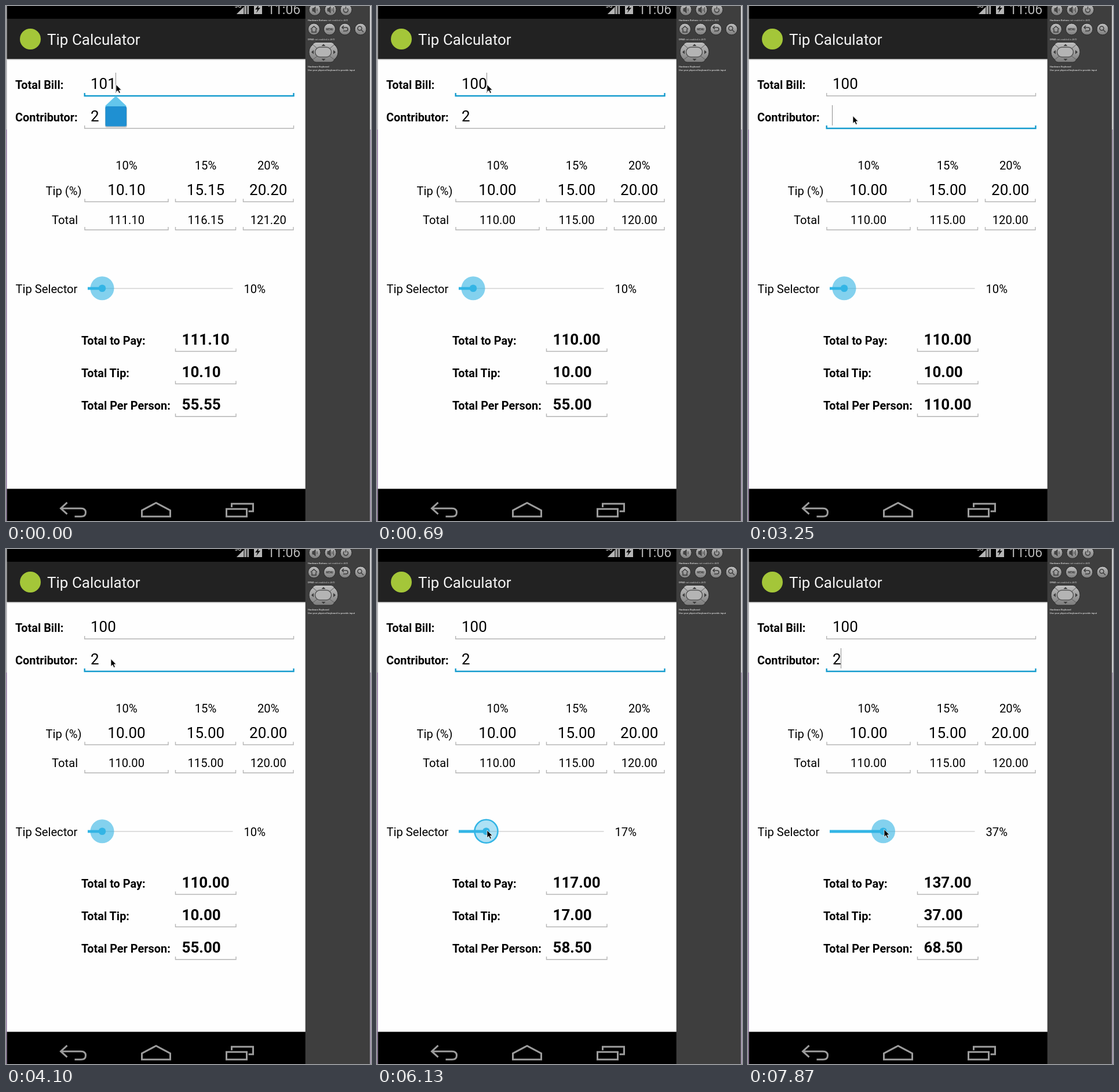
An HTML page that plays this animation: 630x888 px, repeating every 8000 ms.

```html
<!DOCTYPE html>
<html lang="en">
<head>
<meta charset="utf-8">
<title>Tip Calculator</title>
<style>
html, body { margin: 0; width: 100%; height: 100%; overflow: hidden; background: #fff; }
svg { display: block; width: 630px; height: 888px; font-family: Roboto, sans-serif; }
.s { font-size: 20.2px; }
.s.b { font-size: 19.9px; }
.m { font-size: 26px; }
.b { font-weight: 700; }
.c { text-anchor: middle; }
.tiny { font-size: 4.15px; fill: #c4c4c4; }
.line { fill: none; stroke: #b4b4b4; stroke-width: 1.4; }
.line.focus { stroke: #149bcd; stroke-width: 2.4; }
.nav { fill: none; stroke: #9c9c9c; stroke-width: 3; }
.glyph { fill: none; stroke: #3c3c3c; stroke-width: 1.5; }
</style>
</head>
<body>
<svg id="stage" viewBox="0 0 630 888">
  <defs>
    <linearGradient id="key" x2="0" y2="1">
      <stop stop-color="#c0c0c0"/><stop offset="1" stop-color="#7c7c7c"/>
    </linearGradient>
  </defs>
  <rect width="630" height="888" fill="#fefefe"/>
  <rect width="1.5" height="213" fill="#a9a9ad"/>
  <rect y="213" width="1.5" height="675" fill="#8c739c"/>

  <!-- status, title and navigation bars -->
  <rect x="1.500" width="515.500" height="22" fill="#000"/>
  <rect x="1.500" y="22" width="515.500" height="69" fill="#222"/>
  <rect x="1.500" y="91" width="515.500" height="1" fill="#8a8a8a"/>
  <rect x="1.500" y="92" width="515.500" height="1.500" fill="#e4e4e4"/>
  <rect x="1.500" y="832.500" width="515.500" height="55.500" fill="#000"/>
  <g fill="#b5b5b5">
    <text x="395" y="3" font-size="9" class="b">3G</text>
    <path d="M398 14L419 -7V14Z" fill="#555"/>
    <path d="M398 14L410 2V14Z"/>
    <path d="M412 0h2v14h-2zM417 -5h2v19h-2z"/>
    <rect x="428" y="-8" width="14" height="22"/>
    <path d="M437 -3L430 6h4l-2 6 7-9h-4z" fill="#111"/>
    <text x="451" y="13.5" font-size="23">11:06</text>
  </g>
  <circle cx="42" cy="57" r="18" fill="#a4c639"/>
  <text x="71" y="66.500" class="m" fill="#f4f4f4">Tip Calculator</text>
  <g class="nav" transform="translate(-.5 -.8)">
    <path d="M106 857L95 867L106 877M95 867H130Q138 867 138 874T130 881H119"/>
    <path d="M235 881V870.500L259.500 857.500L284 870.500V881Z"/>
    <path d="M381 868H416V881H381ZM390 865V859H427V872H419"/>
  </g>

  <!-- emulator side panel -->
  <rect x="516.700" width="111.800" height="888" fill="#3e3e3e"/>
  <rect x="628.500" width="1.500" height="213" fill="#d9d9dd"/>
  <rect x="628.500" y="213" width="1.500" height="675" fill="#a394b0"/>
  <g id="keys" fill="url(#key)" stroke="#2a2a2a"></g>
  <g class="glyph">
    <path d="M529 4v5h2l3 3V1l-3 3zM537 4v5" fill="#444" stroke-width="1"/>
    <path d="M555 4v5h2l3 3V1l-3 3zM563 4v5M565.500 2v9" fill="#444" stroke-width="1"/>
    <path d="M584 4a4 4 0 1 0 5 0M586.500 1v5"/>
    <path d="M526 40L531.500 35L537 40M528 40V45H535V40"/>
    <path d="M581 37H587a3 3 0 0 1 0 6H582M583 34L580 37L583 40"/>
    <circle cx="610.500" cy="38.500" r="3.500"/><path d="M613 41L617 45"/>
  </g>
  <text x="558.500" y="41.500" class="b c" font-size="4.500" fill="#333">MENU</text>
  <path d="M535 62.500H561Q565 62.500 567 67Q573 72 573 79.500T567 92Q565 97 561 97H535Q531 97 529 92Q523 87 523 79.500T529 67Q531 62.500 535 62.500Z" fill="url(#key)" stroke="#2a2a2a"/>
  <path d="M530 67L538 74M566 67L558 74M530 92L538 86M566 92L558 86" stroke="#5c5c5c"/>
  <rect x="533.500" y="71" width="28" height="17" rx="8.500" fill="#b4b4b4" stroke="#555" stroke-width="1.500"/>
  <path d="M544.500 69h7l-3.500-3.500zM544.500 91h7l-3.500 3.500zM531 76v7l-4-3.500zM565 76v7l4-3.500z" fill="#3c3c3c"/>
  <g class="tiny">
    <text x="521" y="26"><tspan class="b">Hardware Buttons</tspan> not enabled in AVD</text>
    <text x="521" y="58.500"><tspan class="b">DPAD</tspan> not enabled in AVD</text>
    <text x="521" y="106" class="b">Hardware Keyboard</text>
    <text x="521" y="112" class="b">Use your physical keyboard to provide input</text>
  </g>

  <g id="form"></g>

  <g id="slider">
    <path d="M142 487H391.500" stroke="#dedede" stroke-width="1.800"/>
    <path id="bar" stroke="#33b5e5" stroke-width="4.800"/>
    <g id="thumb">
      <circle id="halo" r="20.500" fill="#33b5e5"/>
      <circle id="ring" r="20" fill="none" stroke="#33b5e5" stroke-width="2.600"/>
      <circle r="6.300" fill="#33b5e5"/>
    </g>
  </g>
  <path id="caret" stroke="#8c8c8c" stroke-width="1"/>
  <g id="handle">
    <rect x="-18.500" y="19" width="38" height="35.500" rx="3" fill="#000" opacity=".22"/>
    <path d="M0 0L18 17V22H-18V17Z" fill="#63c6ec"/>
    <rect x="-18" y="18" width="36.500" height="34.500" rx="2.500" fill="#1f90d2"/>
  </g>
  <path id="mouse" d="M0 0V13L3 10.300L5.200 15L7.400 14L5.300 9.400H9.300Z" fill="#000" stroke="#fff" stroke-width=".8"/>
</svg>
<script>
const NS = 'http://www.w3.org/2000/svg';
const $ = id => document.getElementById(id);
const form = $('form');

function add(parent, tag, attrs, text = '') {
  const el = document.createElementNS(NS, tag);
  for (const k in attrs) el.setAttribute(k, attrs[k]);
  el.textContent = text;
  return parent.appendChild(el);
}
const label = (x, y, cls, text) => add(form, 'text', { x, y, class: cls }, text);
const bracket = (x1, x2, y) => `M${x1} ${y - 5}V${y}H${x2}V${y - 5}`;
const underline = (x1, x2, y) => add(form, 'path', { class: 'line', d: bracket(x1, x2, y) });

[533, 560, 587].forEach(cx => add($('keys'), 'circle', { cx, cy: 6.5, r: 10 }));
[531.5, 558.5, 585, 612].forEach(cx => add($('keys'), 'circle', { cx, cy: 40, r: 10 }));

label(16, 143, 's b', 'Total Bill:');
label(16, 199, 's b', 'Contributor:');
label(68.5, 325.5, 's', 'Tip (%)');
label(79, 376, 's', 'Total');
label(16.5, 495, 's', 'Tip Selector');
label(130, 583.5, 's b', 'Total to Pay:');
label(130, 639.5, 's b', 'Total Tip:');
label(130, 695.5, 's b', 'Total Per Person:');

const fields = [155, 211].map(y => ({
  text: label(146, y - 12, 'm', ''),
  line: underline(135.7, 496.5, y)
}));
const columns = [[10, 136, 280], [15, 292.5, 396.5], [20, 409.5, 496]].map(([rate, x1, x2]) => {
  const mid = (x1 + x2) / 2;
  label(mid, 282, 's c', rate + '%');
  underline(x1, x2, 337.5);
  underline(x1, x2, 386);
  return { rate, tip: label(mid, 326, 'm c', ''), total: label(mid, 376, 's c', '') };
});
const results = [595.5, 651.5, 707.8].map(y => ({
  y, text: label(303.5, y - 11.5, 'm b', ''), line: underline(292.5, 397, y)
}));
const percent = label(410.5, 495, 's', '');

// Each step changes some of the state and holds until the next.
const steps = [
  [0, { bill: '101', people: '2', focus: 0, caret: 1, handle: 1, mouse: [190, 135.5], thumb: 10, pct: 10, press: 0 }],
  [250, { bill: '10', handle: 0 }],
  [690, { bill: '100' }],
  [1200, { caret: 0 }],
  [1630, { caret: 1, mouse: [189, 142] }],
  [1780, { mouse: [186, 160] }],
  [1920, { mouse: [183, 178] }],
  [2070, { mouse: [181, 189.5] }],
  [2230, { focus: 1 }],
  [2390, { handle: 1 }],
  [2820, { caret: 0 }],
  [3250, { people: '', caret: 1, handle: 0 }],
  [3540, { people: '2' }],
  [4100, { caret: 0 }],
  [4380, { caret: 1, mouse: [182, 215] }],
  [4520, { mouse: [186, 275] }],
  [4660, { mouse: [187, 350] }],
  [4800, { mouse: [182, 420] }],
  [4950, { caret: 0, mouse: [174, 465] }],
  [5090, { mouse: [170, 485] }],
  [5240, { press: 1 }],
  [5380, { mouse: [171, 485.5], thumb: 10.8, pct: 11 }],
  [5520, { caret: 1, mouse: [178, 485.5], thumb: 14, pct: 14 }],
  [5680, { mouse: [185, 485.5], thumb: 17, pct: 17 }],
  [5990, { caret: 0, mouse: [190, 485], thumb: 19 }],
  [6150, { mouse: [196, 485], thumb: 22 }],
  [6290, { mouse: [203, 485], thumb: 25 }],
  [6450, { caret: 1, mouse: [209, 484.5], thumb: 27.5 }],
  [6780, { mouse: [212.5, 484.5], thumb: 28.8 }],
  [6920, { caret: 0 }],
  [7040, { press: 0 }],
  [7290, { press: 1, pct: 29 }],
  [7430, { caret: 1, mouse: [224, 484], thumb: 33, pct: 33 }],
  [7570, { mouse: [235, 483.5], thumb: 37, pct: 37 }],
  [7870, { press: 0 }]
];

function draw(s) {
  const bill = +s.bill, tip = bill * s.pct / 100, pay = bill + tip;
  const wide = pay >= 100 ? 397 : 382;
  [s.bill, s.people].forEach((value, i) => {
    fields[i].text.textContent = value;
    fields[i].line.setAttribute('class', s.focus === i ? 'line focus' : 'line');
  });
  for (const c of columns) {
    const part = bill * c.rate / 100;
    c.tip.textContent = part.toFixed(2);
    c.total.textContent = (bill + part).toFixed(2);
  }
  [pay, tip, pay / (+s.people || 1)].forEach((value, i) => {
    results[i].text.textContent = value.toFixed(2);
    results[i].line.setAttribute('d', bracket(292.5, wide, results[i].y));
  });
  percent.textContent = s.pct + '%';

  const x = 141 + s.thumb * 2.5;
  $('bar').setAttribute('d', `M141 487H${x}`);
  $('thumb').setAttribute('transform', `translate(${x} 486.8)`);
  $('halo').setAttribute('opacity', s.press ? 0.4 : 0.6);
  $('ring').setAttribute('opacity', s.press);

  const active = s.focus ? s.people : s.bill;
  const cx = Math.round(146 + active.length * 14.6) - 0.5, cy = 115 + s.focus * 56;
  $('caret').setAttribute('d', `M${cx} ${cy}V${cy + 35}`);
  $('caret').setAttribute('opacity', s.caret);
  $('handle').setAttribute('transform', `translate(${cx} ${cy + 40})`);
  $('handle').setAttribute('opacity', s.handle);
  $('mouse').setAttribute('transform', `translate(${s.mouse})`);
}

let shown = -1;
function tick() {
  const t = performance.now() % 8000;
  let n = 0;
  while (n + 1 < steps.length && steps[n + 1][0] <= t) n++;
  if (n !== shown) {
    shown = n;
    draw(Object.assign({}, ...steps.slice(0, n + 1).map(step => step[1])));
  }
  requestAnimationFrame(tick);
}
tick();
</script>
</body>
</html>
```
